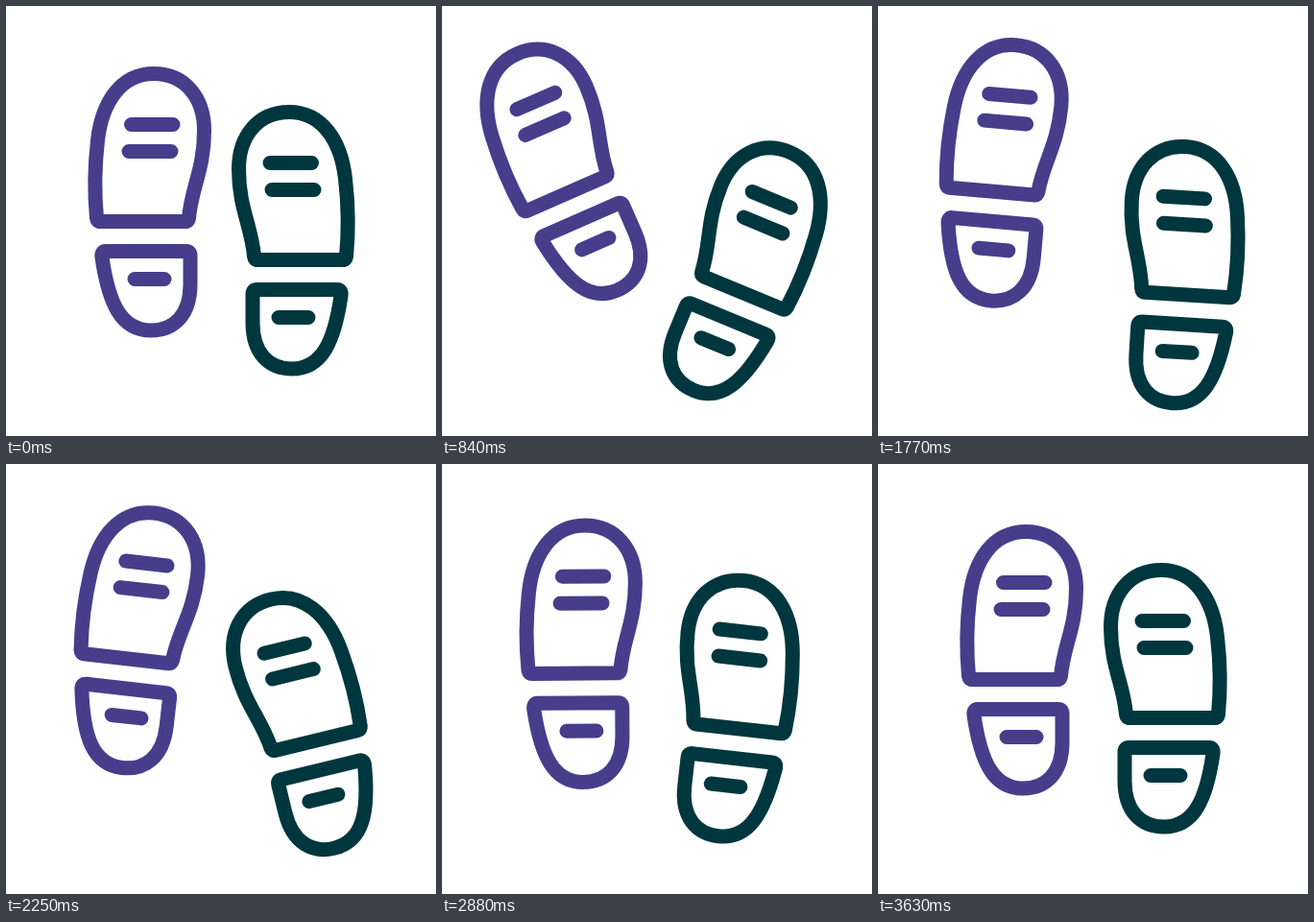
An HTML page for the animation above (5.4 s loop, 448x448 px).

```html
<!DOCTYPE html>
<html lang="en">
<head>
<meta charset="utf-8">
<title>Footsteps</title>
<style>
  html, body { margin: 0; width: 100%; height: 100%; overflow: hidden; background: #fff; }
  svg { display: block; width: 100%; height: 100%; }
</style>
</head>
<body>
<svg viewBox="0 0 448 448" fill="none" stroke-width="15" stroke-linecap="round" stroke-linejoin="round">
  <defs>
    <g id="sole">
      <path d="M98 224.5H187Q190 224.5 190.5 221C193 190 206.5 170 206.5 130C206.5 95 186 70.5 154 70.5C120 70.5 100 100 95.500 140C92 170 92 195 94.500 221Q95 224.500 98 224.500Z"/>
      <path d="M104 255.500H188Q192 255.500 192 260V290C192 322 175 338 151 338C120 338 107 310 100 262Q99 255.500 104 255.500Z"/>
      <path d="M130.500 123.500H174M128 151.500H172M134 284.500H165"/>
    </g>
  </defs>
  <use id="left" href="#sole" stroke="#483d8b"/>
  <g transform="translate(449 40) scale(-1 1)">
    <use id="right" href="#sole" stroke="#00373f"/>
  </g>
</svg>
<script>
const LOOP = 5400, STEP = 30;

// shift: full travel; out: rise time; back: return span; turns: [ms, degrees]
const feet = [
  {
    el: document.getElementById('left'),
    shift: [-25, -34.7], out: 1280, back: [1300, 3480],
    turns: [[0, 0], [1320, -27.2], [1440, -27.2], [1950, 18], [2630, -10], [3050, 5], [3480, 0]]
  },
  {
    el: document.getElementById('right'),
    shift: [-19.2, 40.3], out: 1480, back: [1280, 3690],
    turns: [[0, 0], [1440, -27.2], [2080, 18], [2750, -9], [3200, 4], [3630, 0]]
  }
];

const clamp = u => Math.min(1, Math.max(0, u));
const easeOut = u => 1 - (1 - u) ** 2;
const smooth = u => u * u * (3 - 2 * u);

function angle(turns, t) {
  const i = turns.findIndex(k => k[0] > t);
  if (i < 0) return 0;
  const [t0, a] = turns[i - 1], [t1, b] = turns[i];
  const ease = i === 1 ? easeOut : smooth;
  return a + (b - a) * ease((t - t0) / (t1 - t0));
}

function pose({ el, shift, out, back: [from, to], turns }, t) {
  const rise = easeOut(clamp(t / out));
  const fall = 1 - smooth(clamp((t - from) / (to - from)));
  const k = t < 3630 ? Math.min(rise, fall) : 0;
  el.setAttribute('transform',
    `translate(${shift[0] * k} ${shift[1] * k}) rotate(${angle(turns, t)} 150.75 204)`);
}

function draw() {
  const t = Math.floor(performance.now() % LOOP / STEP) * STEP;
  feet.forEach(foot => pose(foot, t));
  requestAnimationFrame(draw);
}
draw();
</script>
</body>
</html>
```
